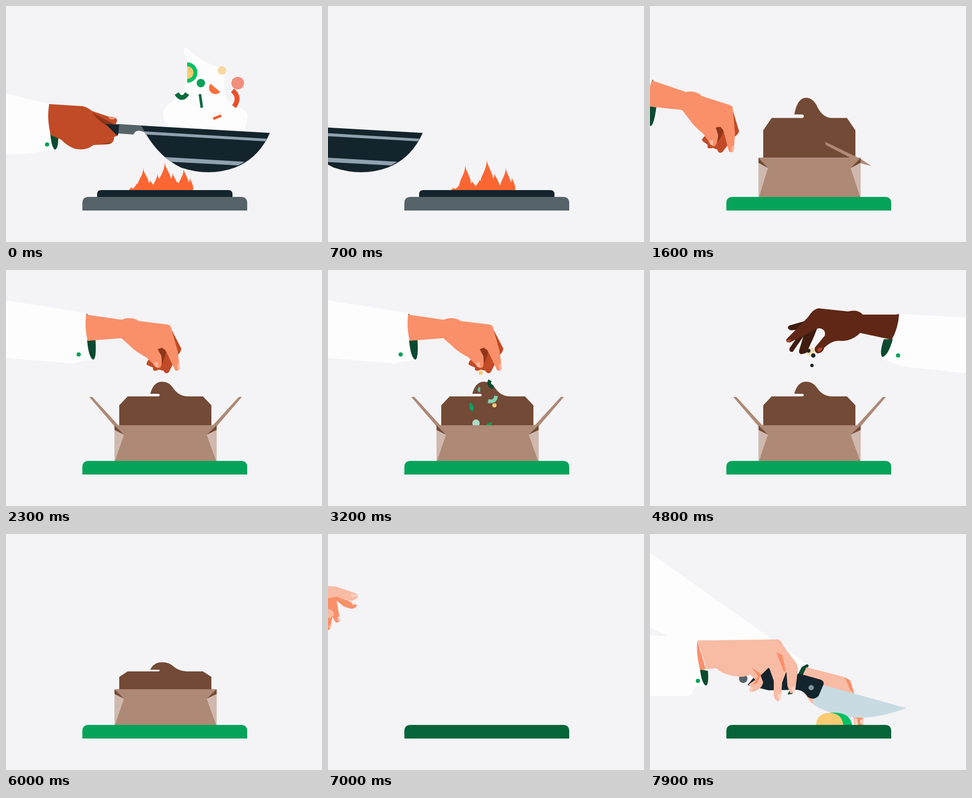
Write an HTML page that moves like this. It is 600 by 450 pixels and loops after 8 s.

```html
<!DOCTYPE html>
<html>
<head>
<meta charset="utf-8">
<style>
html, body { margin: 0; width: 100%; height: 100%; overflow: hidden; background: #f4f3f5; }
svg { display: block; width: 600px; height: 450px; }
.white { fill: #fdfdfe; } .cuff { fill: #0b4a30; } .green { fill: #06a35a; }
.ink { fill: #14242c; } .steel { fill: #566469; }
.rust { fill: #c04b26; } .coral { fill: #f9906a; } .peach { fill: #f8bba4; } .nail { fill: #fbd9cc; }
.umber { fill: #602716; } .shade { fill: #8f3519; }
.card { fill: #ae8975; } .cocoa { fill: #734a36; }
</style>
</head>
<body>
<svg viewBox="0 0 600 450">
  <g id="stove">
    <path id="fire" fill="#fb6633"/>
    <path id="burner" class="ink" d="M173 366V359Q173 351 181 351H422Q430 351 430 359V366Z"/>
  </g>

  <g id="panScene">
    <path id="rice" class="white" d="M338 80Q345 78 351 87Q375 108 406 118Q416 125 414 145Q414 165 418 175Q425 187 447 195Q462 205 458 217L452 245H315L300 215Q294 200 308 188Q320 180 332 165Q346 150 345 110Q336 90 338 80Z"/>
    <g id="toss"></g>
    <path class="steel" d="M213 225L260 228L264 241Q247 233 242 245L212 243Z"/>
    <path class="ink" d="M186 223L215 226L213 245Q211 249 206 248ZM257 228L501 242Q480 290 435 308Q385 326 332 308Q285 285 257 228Z"/>
    <path fill="#90a1b0" d="M262 239L495 253L492 258L265 245ZM301 288L453 297L441 304L313 297Z"/>
    <path class="white" d="M-300 100L0 167L83 187Q76 230 92 275L68 277Q60 281 0 283L-300 290Z"/>
    <path class="cuff" d="M84 242L99 246Q100 272 93 274Q86 270 84 242Z"/>
    <circle class="green" cx="78" cy="264" r="4"/>
    <path class="rust" d="M82 187L145 191Q155 193 163 200L195 211Q211 211 211 219L208 226L188 224L211 247L205 250Q206 263 192 264L166 265Q152 277 130 272Q115 266 105 255L85 246Q77 215 82 187Z"/>
    <path class="shade" d="M163 203L206 226L188 224L196 231Q180 224 163 203ZM181 263L198 260L196 263Z"/>
    <path fill="#ef9a80" d="M195 212Q207 211 207 215Q202 218 195 214Z"/>
  </g>

  <g id="box">
    <path id="back" class="cocoa" d="M215 296V258L231 241H288Q292 241 292 238.500Q292 236 288 236H274Q280 213 296 213Q310 213 318 226Q328 240 344 241H374L390 258V296Z"/>
    <g id="food"></g>
    <path id="flapL" class="card" d="M158 242H164L214 297L224 314L206 298Z"/>
    <path id="flapR" class="card" d="M448 242H442L392 297L382 314L400 298Z"/>
    <path fill="#cfb8ae" d="M206 296H400V364H206Z"/>
    <path class="card" d="M206 296H400L381 314L399 364H207L224 314Z"/>
    <path class="cocoa" d="M206 296L224 314L206 305ZM400 296L381 314L400 305Z"/>
    <path id="lid" fill="#9b7562" d="M215 296V258L231 241H274Q280 213 296 213Q310 213 318 226Q328 240 344 241H374L390 258V296Z"/>
  </g>

  <g id="left">
    <path class="white" d="M-300 11L0 58L153 82Q149 110 157 135L161 172Q140 174 128 178L0 168L-300 145Z"/>
    <path class="cuff" d="M152 88L153 83L156 86ZM154 134L170 134Q172 168 166 171Q157 168 154 134Z"/>
    <circle class="green" cx="138" cy="161" r="4"/>
    <g id="leftHand">
      <path class="rust" d="M315 115L333 150Q332 157 326 162L309 195Q303 200 299 192L290 190Q278 196 279 186L270 182Q265 181 268 175L285 150Z"/>
      <path class="shade" d="M281 148L297 142L304 158L297 178Z"/>
      <path class="coral" d="M152 85L220 95Q228 91 238 92Q247 93 251 97L307 104Q313 105 314 112L326 155L330 188Q327 194 321 191L303 153L296 148L288 151L295 164Q297 180 293 186Q285 189 279 179L267 167Q245 155 236 145L219 130L155 135Q149 110 152 85Z"/>
      <path fill="#fbb9a0" d="M325 179L329 178L330 188Q327 193 325 188ZM281 178L288 175L289 185Q284 187 281 178Z"/>
    </g>
  </g>

  <g id="right">
    <path class="white" d="M960 110L600 90L473 84Q470 115 459 133L441 169Q470 182 490 185L600 197L960 235Z"/>
    <path class="cuff" d="M444 132L461 132Q452 164 441 166Q435 158 444 132Z"/>
    <circle class="green" cx="471" cy="163" r="4"/>
    <path fill="#3f1c10" d="M302 95L264 106Q258 112 268 115L290 113L265 149Q263 157 271 156L291 127L283 154Q283 162 290 160L297 158L310 130L318 110Z"/>
    <path class="umber" d="M473 84Q471 112 459 133L399 120Q382 137 360 135Q345 134 331 148Q328 158 319 159Q311 157 313 148L332 125Q334 113 322 111Q312 112 298 122L266 138Q257 139 259 132L300 90Q310 74 320 73L376 79Q395 74 404 85L466 85Z"/>
    <path fill="#b5492a" d="M260 133L268 132L266 137Q258 140 260 133ZM318 150L327 147Q326 156 319 156Z"/>
  </g>

  <g id="reach">
    <path class="coral" d="M-110 100L0 118L18 119L40 128L55 135Q52 143 42 142L30 138L16 127L23 165Q20 170 14 168L8 158L4 181Q0 185 -4 181L-20 140L-110 125Z"/>
    <path class="peach" d="M-110 80L-30 97L15 100L53 113Q58 117 55 122Q48 128 40 127L18 119L0 122L-110 115ZM-8 143Q10 141 11 153Q8 161 -4 160Z"/>
    <path class="nail" d="M43 115L55 116Q54 120 46 119ZM43 128L53 134L46 135ZM18 158L22 157V165L19 167ZM1 174L4 174L3 182Z"/>
  </g>

  <g id="hold">
    <path class="white" d="M-400 -250L0 36L298 248L285 275L250 300L35 195L0 178L-400 -20Z"/>
    <path class="cuff" d="M288 254Q302 244 301 252L270 305L261 306Z"/>
    <path class="peach" d="M297 254L370 273Q377 275 380 283L387 303L405 350V364H388L385 345L330 335L306 322L290 300L280 290Z"/>
    <path class="coral" d="M370 274L380 279L388 304L380 297ZM391 350H403V364H395Z"/>
    <path class="nail" d="M389 352H393L395 364H390ZM399 354H404V362H400Z"/>
  </g>

  <g id="knife">
    <path fill="#c8dbe2" d="M329 288L487 332Q440 349 405 350Q365 352 320 331L309 324V314Z"/>
    <circle class="steel" cx="177" cy="276" r="8"/>
    <path class="ink" d="M222 253L232 260L290 268L325 278Q332 282 329 288L320 309Q310 318 300 311Q290 296 276 297L225 298L185 288L200 270Z"/>
    <circle fill="#8296a2" cx="306" cy="293" r="5"/>
    <path class="white" d="M-300 180L35 195L92 203L106 290L84 291Q82 309 70 309H-300Z"/>
    <path class="cuff" d="M95 258L110 261Q112 288 106 289Q98 285 95 258Z"/>
    <circle class="green" cx="91" cy="280" r="4"/>
    <path class="peach" d="M90 203L244 201Q250 204 253 213L279 248Q282 256 280 265L276 297Q273 305 266 303L261 290L259 262L251 283L249 308Q249 317 243 319Q236 316 235 308L235 280L226 254L210 270L215 283Q212 293 206 296Q198 302 190 300Q187 295 192 291L187 287L200 278L190 268Q180 273 170 272Q140 270 126 256L108 258Z"/>
    <path class="coral" d="M90 204L106 258L95 259Q87 225 90 204ZM240 226L251 230L258 262L254 262ZM193 255L211 267L203 285L196 287L205 271Z"/>
    <path class="nail" d="M242 307L249 304Q249 316 245 317ZM268 293L276 290Q275 303 270 301ZM190 293L197 293L191 299Z"/>
  </g>

  <g id="veg">
    <path fill="#00c064" d="M340 341Q380 337 384 365H330Z"/>
    <path fill="#f9cb72" d="M315 365Q317 341 341 341Q365 342 367 365Z"/>
  </g>
  <path id="board" d="M145 390V376Q145 364 157 364H446Q458 364 458 376V390Z"/>
</svg>
<script>
const $ = id => document.getElementById(id);
const move = (id, tf) => $(id).setAttribute('transform', tf);
const show = (id, on) => $(id).style.display = on ? '' : 'none';

// Eased value at time t from alternating time, value keys
function key(t, ...k) {
  if (t <= k[0]) return k[1];
  for (let i = 2; i < k.length; i += 2) {
    if (t < k[i]) {
      const u = (t - k[i - 2]) / (k[i] - k[i - 2]);
      return k[i - 1] + (k[i + 1] - k[i - 1]) * u * u * (3 - 2 * u);
    }
  }
  return k[k.length - 1];
}

const dot = (r, c) => `<circle r="${r}" fill="${c}"/>`;
const fill = (d, c) => `<path d="${d}" fill="${c}"/>`;
const line = (d, c, w) => `<path d="${d}" fill="none" stroke="${c}" stroke-width="${w}"/>`;
const half = r => `M0 ${-r}A${r} ${r} 0 0 1 0 ${r}Z`;

// x, y, spin, drawing
const tossed = [
  [344, 127, 0, fill(half(19.5), '#00c064') + fill(half(12), '#f9cb72')],
  [370, 147, 0, dot(8, '#06a35a')],
  [410, 123, 0, dot(8, '#fbd7a0')],
  [440, 147, 0, dot(12, '#ef8f7c')],
  [395, 159, 40, fill('M-12 -4H12A12 12 0 0 1 -12 -4Z', '#f9703c')],
  [430, 176, 0, line('M0 -15Q16 -2 3 16', '#e8502c', 9)],
  [334, 167, 0, line('M-10 0Q0 15 10 0', '#0b6a3d', 9)],
  [370, 181, -8, line('M0 -13V13', '#0b6a3d', 5)],
  [401, 212, -22, line('M-8 0H8', '#f0592b', 5)]
];
const leaf = 'M0 -9Q8 2 1 9Q-8 2 0 -9Z';
const herbs = [
  [290, 196, 0, dot(4, '#f9cb72')],
  [309, 218, 30, line('M-5 -6Q-5 4 7 3', '#0b4a30', 7)],
  [289, 228, 180, fill(half(5), '#59c394')],
  [312, 245, 0, line('M-8 5Q6 8 7 -5', '#7fd3ac', 7)],
  [316, 258, 0, dot(4, '#f9cb72')],
  [272, 261, -10, fill(leaf, '#06a35a')],
  [281, 292, 0, dot(7, '#a9dcc8')],
  [305, 296, 50, fill(leaf, '#06a35a')]
];
const grains = [
  [305, 156, 0, dot(8, '#fbdcae')],
  [301, 154, 0, dot(3.7, '#14242c')],
  [310, 163, 0, dot(4, '#14242c')],
  [307.500, 182, 0, dot(3.200, '#14242c')]
];
const place = (x, y, a, art) => `<g transform="translate(${x} ${y}) rotate(${a})">${art}</g>`;

// Repeating shower that passes through the listed places at time at
function shower(t, items, at, top, from, to, period) {
  const g = 0.00066;
  return items.map(([x, y, a, art]) => {
    const start = at - Math.sqrt((y - top) / g);
    const age = ((t - start) % period + period) % period;
    const born = t - age;
    if (born < from || born > to) return '';
    const ny = top + g * age * age;
    return ny > 330 ? '' : place(x, ny, a + (ny - y), art);
  }).join('');
}

const flames = [[238, 6, 4], [248, 14, 6], [260, 43, 11], [273, 20, 8], [287, 32, 8],
  [301, 55, 13], [316, 34, 9], [325, 18, 8], [337, 42, 10], [349, 24, 6]];
function firePath(t) {
  const size = key(t, 650, 1, 900, 0);
  return flames.map(([x, h, w], i) => {
    const H = h * size * (1 + 0.15 * (Math.sin(t / 70 + i * 2) - Math.sin(i * 2)));
    const y = k => 351 - H * k;
    return `M${x - w} 352C${x - w * 1.3} ${y(.4)} ${x + w * .2} ${y(.6)} ${x} ${y(1)}` +
      `C${x + w * .1} ${y(.7)} ${x + w * 1.4} ${y(.5)} ${x + w} 352Z`;
  }).join('');
}

function mix(a, b, u) {
  return `rgb(${a.map((v, i) => Math.round(v + (b[i] - v) * u))})`;
}

function drawPan(t) {
  const on = t < 1000;
  show('stove', on);
  show('panScene', t < 950);
  if (!on) return;
  $('fire').setAttribute('d', firePath(t));
  move('burner', `translate(0 ${key(t, 700, 0, 950, 15)})`);
  const tilt = key(t, 0, 0, 250, 2, 450, 0);
  move('panScene', `translate(${key(t, 420, 0, 900, -515)} 0) rotate(${tilt} 80 230)`);
  move('rice', `translate(0 240) scale(1 ${key(t, -200, 1.180, 0, 1, 400, 0)}) translate(0 -240)`);
  $('toss').innerHTML = tossed.map(([x, y, a, art]) =>
    place(x + (380 - x) * Math.min(t / 900, .4), Math.min(y + .0009 * t * t, 268), a + t / 8, art)).join('');
}

function drawBox(t) {
  const on = t >= 1100 && t < 6700;
  show('box', on);
  if (!on) return;
  const tall = key(t, 1050, 0, 1250, 1.08, 1400, .95, 1600, 1.1, 1800, .97, 2000, 1);
  move('box', `translate(0 364) scale(1 ${tall}) translate(0 -364)`);
  const k = t < 4000
    ? key(t, 1350, -.55, 1600, 1.25, 1800, .92, 2000, 1)
    : key(t, 5700, 1, 6000, .62, 6300, -.55);
  const fold = `translate(0 296) scale(1 ${k}) translate(0 -296)`;
  move('back', fold);
  move('lid', fold);
  show('back', k > 0);
  show('lid', k < 0);
  const swing = (late) => t < 4000
    ? key(t, 1500 + late, 129, 1600 + late, 107, 1850 + late, -8, 2050 + late, 0)
    : key(t, 5200 + late, 0, 5400 + late, -6, 5700 + late, 129);
  const l = swing(100), r = swing(0);
  move('flapL', `rotate(${l} 206 298)`);
  move('flapR', `rotate(${-r} 400 298)`);
  show('flapL', l < 125);
  show('flapR', r < 125);
  $('food').innerHTML = shower(t, herbs, 3200, 190, 2450, 3400, 460) +
    shower(t, grains, 4800, 150, 4500, 5150, 500);
}

function drawHands(t) {
  show('left', t > 1300 && t < 4050);
  const x = t < 3000 ? key(t, 1350, -190, 1792, 135, 2100, 153) : key(t, 3600, 153, 4000, -200);
  const y = t < 3000 ? key(t, 1350, 219, 1792, 90, 2100, 85) : key(t, 3600, 85, 4000, 150);
  const r = t < 3000 ? key(t, 1350, 26.500, 1792, 0) : key(t, 3600, 0, 4000, 12);
  move('left', `translate(${x - 153} ${y - 85}) rotate(${r} 153 85)`);
  const rub = t > 2400 && t < 3600 ? 1.2 * Math.sin((t - 3200) / 400 * Math.PI * 2) : 0;
  move('leftHand', `rotate(${rub} 153 100)`);

  show('right', t > 4000 && t < 5950);
  const rx = t < 5000 ? key(t, 4000, 360, 4450, 0) : key(t, 5450, 0, 5900, 360);
  const ry = key(t, 4450, 12, 4600, 12, 4800, 0, 5050, -28, 5400, 8);
  move('right', `translate(${rx} ${ry})`);

  const hx = key(t, 6700, -532, 7450, 0);
  const hy = hx * 370 / 532;
  const reaching = t < 7100;
  show('reach', t >= 6700 && reaching);
  show('hold', t >= 6700 && !reaching);
  show('veg', t >= 6700 && !reaching);
  move('reach', `translate(${hx + 345} ${hy + 240})`);
  move('hold', `translate(${hx} ${hy})`);
  move('veg', `translate(${hx} ${hy})`);

  show('knife', t >= 7550);
  move('knife', `translate(${key(t, 7500, -480, 7850, 0)} ${key(t, 7500, -60, 7900, 0)}) ` +
    `rotate(${key(t, 7500, -25, 7900, 0)} 100 240)`);
}

function frame(now) {
  const t = Math.floor(now % 8000 / 100) * 100;
  drawPan(t);
  drawBox(t);
  drawHands(t);
  $('board').setAttribute('fill', t < 6700
    ? mix([86, 100, 105], [6, 163, 90], key(t, 750, 0, 1050, 1))
    : '#056539');
  requestAnimationFrame(frame);
}
frame(0);
</script>
</body>
</html>
```
